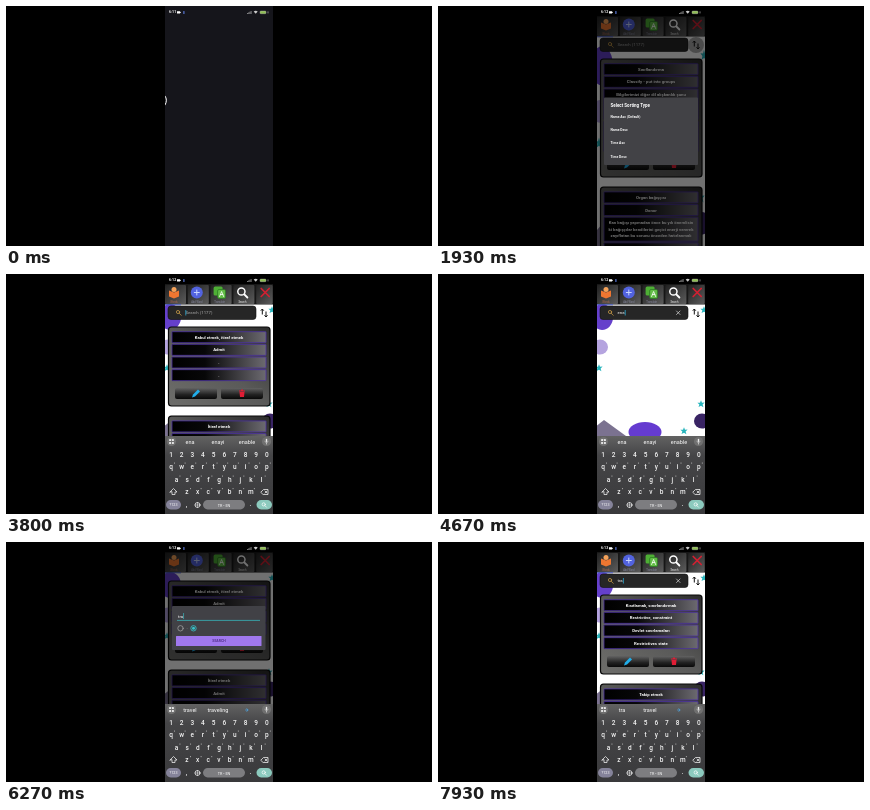
These frames come from a looping animation (426x240 px, 8000 ms). An HTML page:

```html
<!DOCTYPE html>
<html lang="en">
<head>
<meta charset="utf-8">
<title>Vocabulary app</title>
<style>
html, body { margin: 0; width: 100%; height: 100%; overflow: hidden; background: #000; }
svg { display: block; }
#stage { width: 100vw; height: 100vh; }
text { font: 4.3px Roboto, Arial, sans-serif; fill: #fff; dominant-baseline: central; white-space: pre; }
.mid { text-anchor: middle; }
.bold { font-weight: 700; }
.tiny { font-size: 2.6px; }
.key { fill: #f4f4f4; font-weight: 500; }
.line { fill: none; stroke: #fff; stroke-width: 1; stroke-linecap: round; stroke-linejoin: round; }
.thin { stroke-width: .7; }
</style>
</head>
<body>
<svg id="stage" viewBox="0 0 426 240">
  <defs>
    <linearGradient id="cardFill" y1="1" x2="1" y2="0"><stop stop-color="#6e6e6b"/><stop offset=".5" stop-color="#5a5a59"/><stop offset="1" stop-color="#2c2c2c"/></linearGradient>
    <linearGradient id="rowFill"><stop stop-color="#000"/><stop offset=".35" stop-color="#070708"/><stop offset="1" stop-color="#6c6a70"/></linearGradient>
    <linearGradient id="buttonFill" x2="0" y2="1"><stop stop-color="#626262"/><stop offset=".6" stop-color="#222"/><stop offset="1" stop-color="#090909"/></linearGradient>
    <linearGradient id="navFill" x2="1" y2="1"><stop stop-color="#202020"/><stop offset="1" stop-color="#5c5c5c"/></linearGradient>
    <linearGradient id="keyFill" x2="0" y2="1"><stop stop-color="#626262"/><stop offset=".25" stop-color="#454547"/><stop offset="1" stop-color="#39393b"/></linearGradient>
    <clipPath id="screen"><path d="M159 0h108v240H159z"/></clipPath>
    <clipPath id="body"><path d="M159 31h108v209H159z"/></clipPath>
    <path id="star" d="M0-3.7 1-1.2 3.6-1.4 1.6.5 2.4 3.2 0 1.7-2.5 3.1-1.6.4-3.6-1.3-1-1.2z" fill="#28b5bd"/>
  </defs>
  <rect width="426" height="240"/>
  <g clip-path="url(#screen)">
    <g id="app">
      <rect x="159" y="30" width="108" height="210" fill="#fff"/>
      <g id="wallpaper"></g>
      <g clip-path="url(#body)"><g id="lists"></g></g>
      <g id="nav"></g>
      <g id="search">
        <rect x="162" y="32" width="88" height="13.5" rx="3" fill="#262626" stroke="#111" stroke-width=".6"/>
        <g class="line thin" style="stroke:#d6a54b"><circle cx="172" cy="38" r="1.6"/><path d="m173.2 39.3 2 2"/></g>
        <text id="query" x="179.5" y="38.8"></text>
        <rect id="caret" y="36" width=".7" height="5.5" fill="#2bb9e8"/>
        <path id="clear" class="line thin" d="m238.5 37 3.5 3.5m0-3.5-3.5 3.5" style="stroke:#ddd"/>
        <circle id="ripple" cx="258" cy="39" r="8" fill="#888" opacity=".7"/>
        <path d="M256.3 40.5V35m-1.5 1.7 1.5-1.7 1.5 1.7M260 37.5V43m-1.5-1.7L260 43l1.5-1.7" fill="none" stroke="#111"/>
      </g>
      <rect id="dim" x="159" y="10" width="108" height="230"/>
      <g id="sortDialog"></g>
      <g id="addDialog"></g>
      <g id="keyboard"></g>
    </g>
    <g id="launch"><rect x="159" width="108" height="240" fill="#15151b"/><path class="line" d="M159 90q3 4 0 9"/></g>
    <rect id="statusBack" x="159" width="108" height="10"/>
    <g id="status">
      <text id="clock" class="bold" x="163" y="6.4" style="font-size:3.6px"></text>
      <path d="M171 5.2h3v2.4h-3zM174 6.4l1-.8v1.6z" fill="#fff"/>
      <rect x="177.3" y="5" width="1.2" height="3" rx=".6" fill="#5977d5"/>
      <path d="M241.5 8V7m1.2 1V6.4m1.2 1.6V5.7m1.2 2.3V5" stroke="#ccc" stroke-width=".6"/>
      <path d="M247.7 5.4q2-1.4 4 0l-2 2.4z" fill="#ccc"/>
      <rect x="254" y="5.1" width="6" height="2.6" rx=".8" fill="#8ebd52" stroke="#bbb" stroke-width=".4"/>
      <path d="M262 5.4v2" stroke="#ccc" stroke-width=".6"/>
    </g>
  </g>
</svg>
<script>
const $ = id => document.getElementById(id);
const text = (x, y, words, cls = '', style = '') => `<text x="${x}" y="${y}" class="${cls}" style="${style}">${words}</text>`;
const rect = (x, y, w, h, fill, r = 0, extra = '') => `<rect x="${x}" y="${y}" width="${w}" height="${h}" rx="${r}" fill="${fill}" ${extra}/>`;
const set = (id, name, value) => $(id).setAttribute(name, value);
const show = (id, on) => { $(id).style.display = on ? '' : 'none'; };

function actions(y) {
  return rect(169, y, 42, 11, 'url(#buttonFill)', 2) + rect(215, y, 42, 11, 'url(#buttonFill)', 2) +
    `<g transform="translate(190 ${y + 5.5})"><path d="m-4 4 1-3 5-5 2 2-5 5z" fill="#20aeea"/></g>
     <g transform="translate(236 ${y + 5.5})"><path d="M-2.5-1.5h5l-.5 5h-4zM-3-3h6v1h-6zM-1-4h2v1h-2z" fill="#e11d35"/></g>`;
}

function card(top, rows) {
  let y = top + 4.7, body = '';
  for (const row of rows) {
    const lines = row.split('|'), height = 11 + 6.5 * (lines.length - 1);
    body += rect(166, y, 94, height, 'url(#rowFill)', .4, 'stroke="#4a2fa0" stroke-width=".8"');
    lines.forEach((line, i) => { body += text(213, y + 5.6 + i * 6.5, line, 'mid bold'); });
    y += height + 1.65;
  }
  const height = y + 23.7 - top;
  return { height, markup: rect(162.5, top, 101.5, height, 'url(#cardFill)', 3, 'stroke="#080808" stroke-width="1.2"') + body + actions(y + 5.7) };
}

function list(id, cards) {
  let y = 53, markup = '';
  for (const rows of cards) {
    const item = card(y, rows);
    markup += item.markup;
    y += item.height + 10.2;
  }
  return `<g id="${id}">${markup}</g>`;
}

$('lists').innerHTML = list('groups', [
  ['Sınıflandırma', 'Classify - put into groups', 'Bilgilerimizi diğer dil alışkanlık şunu|bulmak için gruplara ayırmak|ve benzer olanları|birlikte tutmak', 'We classify the words|by their meaning|and by the kind|of their use'],
  ['Organ bağışçısı', 'Donor', 'Kan bağışı yapmadan önce bu yılı önemlisin|ki bağışçılar kendilerini geçici enerji vererek|zayıflatan bu sorunu önceden hatırlanmalı', '.']
]) + list('admits', [
  ['Kabul etmek, itiraf etmek', 'Admit', '.', '.'],
  ['İtiraf etmek', 'Admit', '.', '.'],
  ['Kaydetmek (tescil)', 'Admit', '.', '.']
]) + list('results', [
  ['Kısıtlamak, sınırlandırmak', 'Restrictive, constraint', 'Devlet sınırlamaları', 'Restrictives state'],
  ['Takip etmek', 'Track', '.', '.']
]);

const ellipse = (x, y, rx, ry, fill) => `<ellipse cx="${x}" cy="${y}" rx="${rx}" ry="${ry}" fill="${fill}"/>`;
const stars = [[266, 36], [161, 94], [263, 130], [246, 157]];
$('wallpaper').innerHTML = ellipse(164, 43, 11, 13, '#6540cb') + ellipse(162, 73, 8, 7.5, '#b5a4df') +
  ellipse(207, 158, 16.5, 10, '#653bd0') + ellipse(264, 147, 8, 7.5, '#392464') +
  '<path d="m157 153 9-7 22 16h-31z" fill="#7b7290"/>' +
  stars.map(([x, y]) => `<use href="#star" x="${x}" y="${y}"/>`).join('');

const icons = [
  '<path d="m-5-2 5 2v6l-5-2zM0 0l5-2v6l-5 2z" fill="#ee7631"/><circle cy="-3" r="2.5" fill="#f4a25a"/>',
  '<circle r="6" fill="#5263df"/><path class="line" d="M-2.5 0h5M0-2.5v5" style="stroke:#c9d6ff"/>',
  '<rect x="-6" y="-6" width="9" height="9" rx="1.5" fill="#4eaf35"/><rect x="-2" y="-3" width="8" height="9" rx="1.5" fill="#62bd46" stroke="#267520" stroke-width=".7"/><path class="line" d="m0 4 2-5 2 5M.8 2h2.4" style="stroke-width:.8"/>',
  '<circle cx="-1" cy="-1" r="3.6" class="line" style="stroke-width:1.5"/><path d="m2 2 3 3" class="line" style="stroke-width:1.8"/>',
  '<path class="line" d="m-4-4 8 8m0-8-8 8" style="stroke:#d32031;stroke-width:1.7"/>'
];
const tabs = ['Words', 'Add Word', 'Translate', 'Search', 'Exit'];
$('nav').innerHTML = rect(159, 10, 108, 20.5, '#171717') + icons.map((icon, i) => {
  const x = 168 + i * 22.8;
  return rect(x - 9, 11, i === 4 ? 16.5 : 21, 19, 'url(#navFill)', 1) +
    `<g transform="translate(${x} 18.5)">${icon}</g>` +
    (i < 4 ? text(x, 28, tabs[i], 'mid tiny', `fill:${i === 3 ? '#fff' : i ? '#8a8ca4' : '#b46a50'}`) : '');
}).join('') + rect(159, 30.3, 16, 1, '#4b5ed0');

$('sortDialog').innerHTML = rect(166, 91.5, 94, 67.5, '#424246', 1) +
  text(172.5, 99.5, 'Select Sorting Type', 'bold', 'font-size:4.5px') +
  ['Name Asc (Default)', 'Name Desc', 'Time Asc', 'Time Desc'].map((item, i) => text(172.5, 111 + i * 13.2, item, 'bold', 'font-size:3.4px')).join('');

$('addDialog').innerHTML = '<rect id="panel" x="166" y="102" width="93.5" fill="#414146" rx="1"/>' +
  '<text id="entry" x="172" y="112"></text><rect id="entryCaret" y="109" width=".6" height="6" fill="#39c7d0"/>' +
  '<path id="underline" d="M171 116.4h83" stroke-width=".7"/>' +
  '<circle cx="174.5" cy="124.3" r="2.7" class="line thin" style="stroke:#aaa"/>' +
  '<circle id="ring" cx="187.5" cy="124.3" r="2.7" fill="none" stroke-width=".8"/><circle id="dot" cx="187.5" cy="124.3" r="1.5" fill="#36c5cb"/>' +
  text(181, 124.3, '→', 'mid tiny', 'fill:#aaa') + rect(170, 132, 85.5, 10, '#a078ee', .5) +
  text(213, 137.2, 'SEARCH', 'mid bold', 'font-size:3.5px;fill:#54318e') +
  `<g id="answer">${rect(171.5, 147, 66.5, 13.5, '#f2f2fa')}<circle cx="247" cy="153.5" r="5.5" fill="#6946d3"/><circle cx="247" cy="153.5" r="3" class="line" style="stroke:#b9b3ef;stroke-width:.8"/><path class="line thin" d="M245.5 153.5h3m-1.5-1.5v3"/></g>`;

function keys(letters, x, y, hints = true) {
  return [...letters].map((letter, i) => text(x + i * 10.65, y, letter, 'mid key', 'font-size:6.5px') +
    (hints ? rect(x + i * 10.65 + 3, y - 4, .9, 1.2, '#aaa') : '')).join('');
}
$('keyboard').innerHTML = rect(159, 162, 108, 79, 'url(#keyFill)') + '<circle cx="165.5" cy="167.5" r="4.6" fill="#707070"/>' +
  [0, 1, 2, 3].map(i => rect(163.1 + i % 2 * 2.8, 165.1 + (i >> 1) * 2.8, 2, 2, '#e6e6e6', .4)).join('') +
  '<circle cx="260.5" cy="167.5" r="4.6" fill="#707070"/><rect x="259.8" y="164.8" width="1.4" height="3.2" rx=".7" fill="#eee"/><path class="line" d="M258.8 167.6q1.7 2.6 3.4 0m-1.7 1.3v1.2" style="stroke-width:.5"/>' +
  [184, 212, 241].map((x, i) => `<text id="hint${i}" x="${x}" y="167.5" class="mid" style="font-size:5.5px"></text>`).join('') +
  keys('1234567890', 165, 181, false) + keys('qwertyuiop', 165, 192.5) +
  keys('asdfghjkl', 170.5, 205.5) + keys('zxcvbnm', 181, 218) +
  '<path class="line thin" d="m164 218 3.5-3.5L171 218h-2v2.5h-3V218zM255 218l2.5-2.5h4.5v5h-4.5zm4-1 2 2m0-2-2 2"/>' +
  rect(160, 226, 15, 9.5, '#85839a', 4.7) + text(167.5, 231, '?123', 'mid', 'font-size:3.7px') +
  text(180.5, 230.5, ',', 'mid key', 'font-size:6.5px') + '<circle cx="191.5" cy="231" r="2.5" class="line thin"/><path class="line" d="M189 231h5m-2.5-2.5v5" style="stroke-width:.5"/>' +
  rect(197, 226, 42, 9.5, '#7d7d80', 4.7) + text(218, 231, 'TR • EN', 'mid', 'font-size:3.8px') +
  text(244.5, 230, '.', 'mid key', 'font-size:6.5px') + rect(250.5, 226, 15.5, 9.5, '#8ccabe', 4.7) +
  '<circle cx="257.7" cy="230.4" r="1.6" class="line thin"/><path class="line thin" d="m259 231.7 1.5 1.5"/>';

const between = (t, a, b) => t >= a && t < b;
const ramp = (t, a, b) => {
  const p = Math.max(0, Math.min(1, (t - a) / (b - a)));
  return p * p * (3 - 2 * p);
};
const pulse = (t, a, b, fade = 130) => ramp(t, a, a + fade) - ramp(t, b - fade, b);
const typed = (word, t, start, step) => word.slice(0, Math.max(0, Math.floor((t - start) / step) + 1));

function field(id, caret, value, placeholder, x, active) {
  $(id).textContent = value || placeholder;
  $(id).style.fill = value ? '#fff' : '#aaa';
  show(caret, active);
  set(caret, 'x', x + (value ? $(id).getComputedTextLength() + .3 : 0));
}

function draw(t) {
  show('launch', t < 400);
  show('statusBack', t >= 400);
  $('clock').textContent = t < 700 ? '6:11' : t < 5200 ? '6:12' : '6:13';

  const searching = t < 5150 || t >= 7250;
  const query = t < 5150 ? typed('ena', t, 4050, 160) : typed('tra', t, 7550, 120);
  show('search', searching);
  if (searching) field('query', 'caret', query, 'Search (1177)', 179.5, between(t, 3700, 5100) || t > 7450);
  show('clear', query && searching);
  set('ripple', 'opacity', .7 * pulse(t, 1350, 2250));

  show('groups', t < 2300);
  show('admits', between(t, 2300, 4200) || between(t, 5050, 7670));
  show('results', t >= 7670);
  const shift = -14 * (ramp(t, 5150, 5300) - ramp(t, 7200, 7350));
  set('lists', 'transform', `translate(0 ${shift})`);

  // The wallpaper stretches from the status bar to the keyboard.
  const raised = ramp(t, 3600, 3800) - ramp(t, 4950, 5150) + ramp(t, 5850, 6050) - ramp(t, 7030, 7180) + ramp(t, 7350, 7500);
  set('keyboard', 'transform', `translate(0 ${78 * (1 - raised)})`);
  show('keyboard', raised > 0);
  set('wallpaper', 'transform', `translate(0 10) scale(1 ${(230 - 78 * raised) / 152}) translate(0 -10)`);
  const hints = t < 5500 ? ['ena', 'enayi', 'enable'] : t < 7200 ? ['travel', 'traveling', '✈'] : ['tra', 'travel', '✈'];
  hints.forEach((hint, i) => {
    $('hint' + i).textContent = hint;
    $('hint' + i).style.fill = hint === '✈' ? '#4da8e8' : '#fff';
  });

  const sorting = pulse(t, 1450, 2250), adding = pulse(t, 5450, 7130);
  set('dim', 'opacity', .56 * (sorting + adding));
  set('sortDialog', 'opacity', sorting);
  set('addDialog', 'opacity', adding);
  const answered = ramp(t, 6600, 6720);
  set('addDialog', 'transform', `translate(0 ${-38 * ramp(t, 5850, 6050) - 11 * answered})`);
  set('panel', 'height', 44 + 21 * answered);
  show('answer', answered > .5);
  const editing = t >= 5850;
  field('entry', 'entryCaret', typed('travel', t, 6080, 80), 'Type Here..', 172, editing);
  set('underline', 'stroke', editing ? '#36c5cb' : '#888');
  set('ring', 'stroke', editing ? '#36c5cb' : '#aaa');
  show('dot', editing);
}

function tick() {
  draw(performance.now() % 8000);
  requestAnimationFrame(tick);
}
tick();
</script>
</body>
</html>
```
